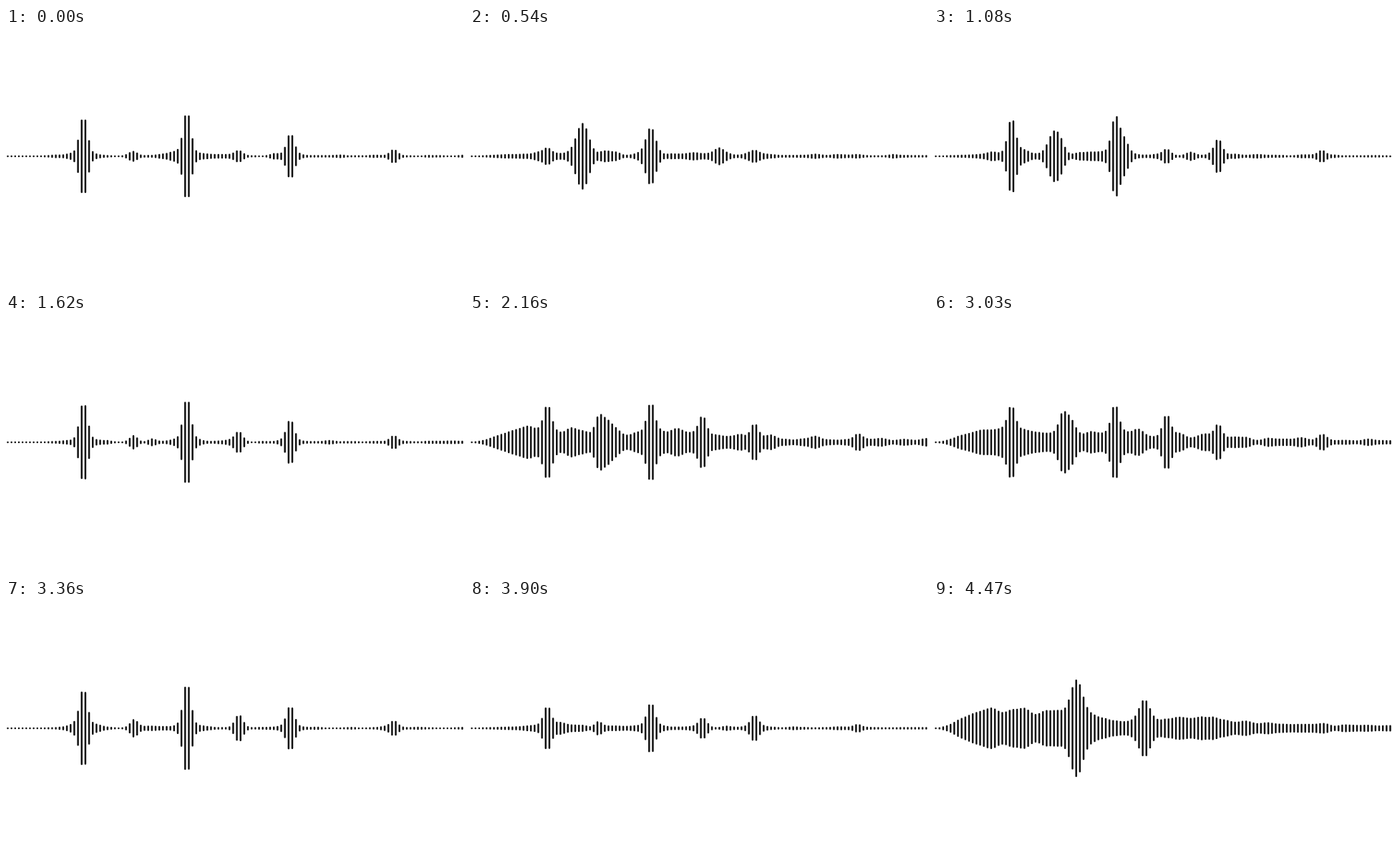
An HTML page with a canvas for the animation above (4500 ms loop, 640x360 px).

```html
<!DOCTYPE html>
<html>
<head>
<meta charset="utf-8">
<style>
html, body { margin: 0; width: 640px; height: 360px; overflow: hidden; background: #fff; }
canvas { display: block; }
</style>
</head>
<body>
<canvas id="stage" width="640" height="360"></canvas>
<script>
const ctx = document.getElementById('stage').getContext('2d');
const LOOP = 4500, BARS = 124, PITCH = 5.163, LEFT = 2.5, MID = 179, BAR_WIDTH = 2.5;

// Level of each part of the voice at a few moments; toneBar is where the tone sits.
const keys = [
  { time: 0,    hum: 1,   between: .45, tone: 0,  toneBar: 26,   breath: 0 },
  { time: 540,  hum: .15, between: 0,   tone: 42, toneBar: 30,   breath: .1 },
  { time: 1620, hum: 1,   between: .8,  tone: 0,  toneBar: 34,   breath: 0 },
  { time: 2700, hum: 0,   between: 1.8, tone: 22, toneBar: 38.5, breath: 1 },
  { time: 3360, hum: 1,   between: 1,   tone: 0,  toneBar: 34,   breath: 0 },
  { time: 3900, hum: .52, between: .75, tone: 0,  toneBar: 34,   breath: .06 },
  { time: 4470, hum: 0,   between: 0,   tone: 45, toneBar: 38,   breath: .95 },
];

const mix = (a, b, u) => a + (b - a) * u;
const bell = (d, width) => Math.exp(-((d / width) ** 2));

function smooth(from, to, x) {
  const u = Math.min(1, Math.max(0, (x - from) / (to - from)));
  return u * u * (3 - 2 * u);
}

function random(a, b) {
  const v = Math.sin(a * 127.1 + b * 311.7) * 43758.5453;
  return v - Math.floor(v);
}

// Smooth noise from 0 to 1, in cells of 3 bars by 180 ms.
function noise(bar, t) {
  const x = Math.floor(bar / 3), y = Math.floor(t / 180);
  const u = smooth(0, 1, bar / 3 - x), v = t / 180 - y;
  const row = r => mix(random(x, r), random(x + 1, r), u);
  return mix(row(y), row(y + 1), v);
}

// Harmonics 28 bars apart, each on a wide foot.
function hum(i) {
  return [50, 56, 28, 8].reduce((sum, h, k) => {
    const d = i - 20.5 - 28 * k;
    return sum + h * (bell(d, 1.42) + .1 * bell(d, 4));
  }, 0);
}

// Weaker peaks halfway between the harmonics.
const between = i => 10 * bell(i - 34.2, 1.3) + 16 * bell(i - 62.5, 1.5);

// A sliding tone with fast fading overtones.
function tone(i, bar) {
  let sum = 0;
  for (let k = 0; k < 3; k++) sum += .65 ** (k * k) * bell(i - bar - 18.5 * k, 2.3 - .3 * k);
  return sum;
}

// A broad swell that rises quickly and dies away to the right.
const breath = i => 38 * smooth(0, 16, i) * Math.exp(-i / 50);

const ripple = i => 8 * smooth(8, 22, i) * Math.exp(-i / 70);

// The picture holds for 60 ms, then steps every 30 ms, in groups of 180 ms.
function stepTime(t) {
  const phase = t % 180;
  return t - phase + (phase < 60 ? 0 : Math.floor(phase / 30) * 30);
}

function voiceAt(t) {
  const next = Math.max(1, keys.findIndex(key => key.time >= t));
  const a = keys[next - 1], b = keys[next];
  const u = (t - a.time) / (b.time - a.time);
  const voice = { swing: Math.sin(Math.PI * u) };
  for (const part in a) voice[part] = mix(a[part], b[part], smooth(0, 1, u));
  return voice;
}

function halfHeight(i, t, voice) {
  const n = noise(i, t);
  const peaks = voice.hum * hum(i) + voice.between * between(i)
    + voice.tone * tone(i, voice.toneBar);
  const swell = voice.breath * breath(i) * (1 + (n - .5) * Math.min(1, .2 + i / 90));
  const gain = 1 + voice.swing * (.2 + .3 * noise(i / 8, t));
  return Math.min(72, 1.2 + (peaks + swell) * gain + ripple(i) * n * n);
}

function draw(t) {
  const voice = voiceAt(t);
  ctx.fillStyle = '#fff';
  ctx.fillRect(0, 0, 640, 360);
  ctx.fillStyle = '#111';
  ctx.beginPath();
  for (let i = 0; i < BARS; i++) {
    const h = halfHeight(i, t, voice);
    ctx.roundRect(LEFT + i * PITCH - BAR_WIDTH / 2, MID - h, BAR_WIDTH, 2 * h, 1.2);
  }
  ctx.fill();
}

const start = performance.now();
function tick() {
  draw(stepTime((performance.now() - start) % LOOP));
  requestAnimationFrame(tick);
}
tick();
</script>
</body>
</html>
```
